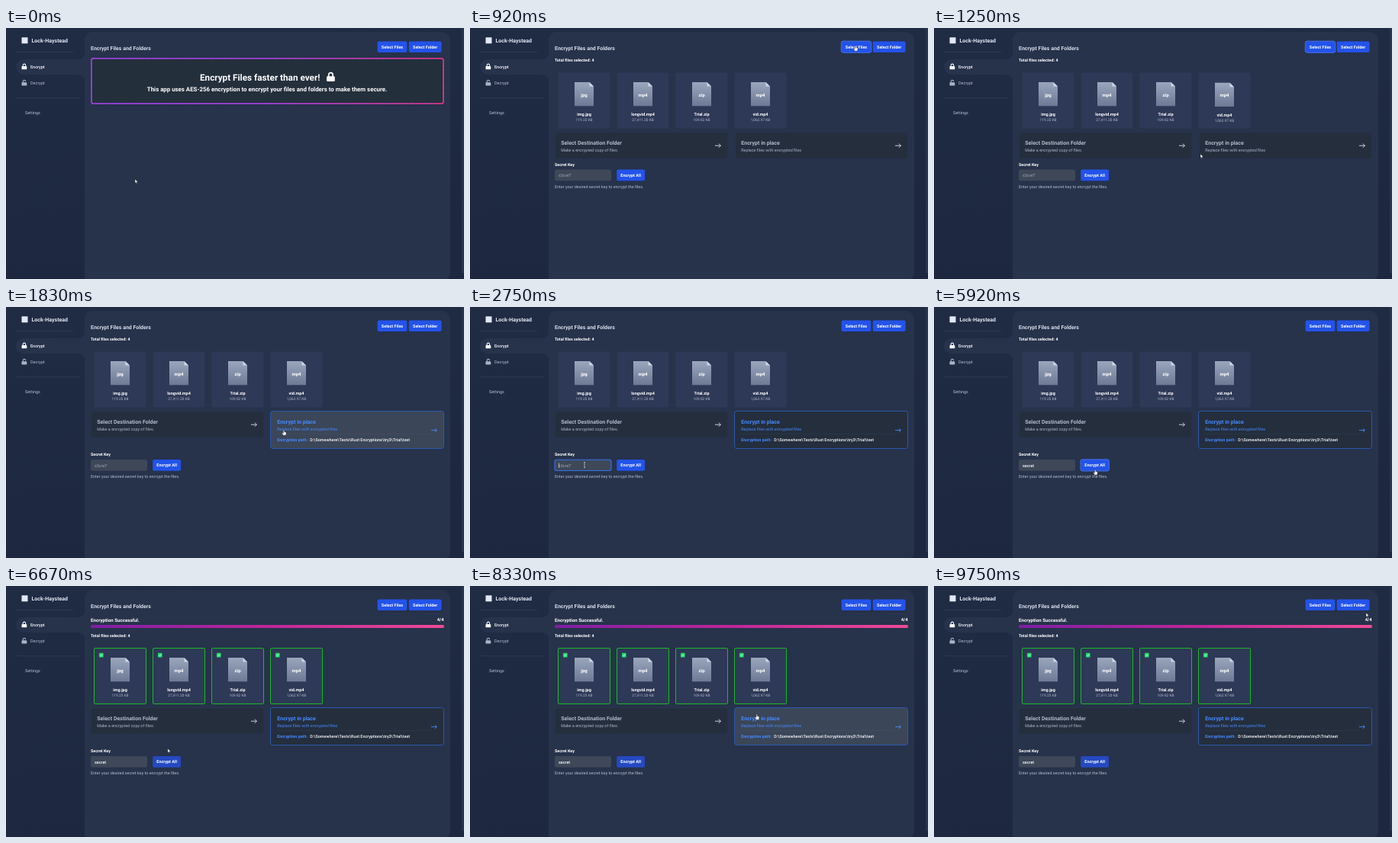
Write an HTML page with a canvas that moves like this. It is 600x329 px and loops after 9.91 s.

```html
<!DOCTYPE html>
<html lang="en">
<head>
<meta charset="utf-8">
<title>File encryption demo</title>
<style>
  html, body { margin: 0; width: 100%; height: 100%; overflow: hidden; background: #1e2940; }
  canvas { display: block; width: 600px; height: 329px; }
</style>
</head>
<body>
<canvas id="stage"></canvas>
<script>
const W = 600, H = 329, LOOP = 9910, FPS = 12;
const canvas = document.getElementById('stage');
const ctx = canvas.getContext('2d');
const dpr = window.devicePixelRatio || 1;
canvas.width = W * dpr;
canvas.height = H * dpr;

const BLUE = '#2353ea', LINK = '#458aff', PANEL = '#242e3d', MAIN = '#27324b';

const files = [
  ['jpg', 'img.jpg', '119.25 KB'],
  ['mp4', 'longvid.mp4', '27,411.20 KB'],
  ['zip', 'Trial.zip', '109.82 KB'],
  ['mp4', 'vid.mp4', '1,062.97 KB']
];

// Pointer path: time, x, y
const path = [
  [250, 169, 198], [580, 505, 23], [920, 505, 23], [1250, 349, 165],
  [1330, 352, 163], [1420, 352, 163], [1580, 364, 161], [2170, 364, 161],
  [2420, 150, 207], [5250, 150, 207], [5670, 211, 213], [6830, 212, 213],
  [7420, 243, 208], [7590, 243, 208], [7920, 372, 207], [8250, 372, 207],
  [8420, 380, 124], [8750, 380, 124], [9000, 566, 35]
];
const keyTimes = [2920, 3330, 3830, 4330, 4420, 4580];

const clamp = v => Math.max(0, Math.min(1, v));
const ramp = (t, a, b) => clamp((t - a) / (b - a));
const easeOut = p => 1 - (1 - p) * (1 - p);
const inside = (p, x, y, w, h) => p.x >= x && p.x <= x + w && p.y >= y && p.y <= y + h;

function pointerAt(t) {
  let a = path[0];
  for (const b of path) {
    if (t < b[0]) {
      const p = ramp(t, a[0], b[0]);
      return { x: a[1] + (b[1] - a[1]) * p, y: a[2] + (b[2] - a[2]) * p };
    }
    a = b;
  }
  return { x: a[1], y: a[2] };
}

// y is the middle of the capitals
function text(str, x, y, size, color, weight = 400, align = 'left') {
  ctx.font = `${weight} ${size}px Roboto, "Open Sans", sans-serif`;
  ctx.textAlign = align;
  ctx.fillStyle = color;
  ctx.fillText(str, x, y + size * 0.355);
}

function box(x, y, w, h, r, fill, stroke, line = 1) {
  ctx.beginPath();
  ctx.roundRect(x, y, w, h, r);
  if (fill) { ctx.fillStyle = fill; ctx.fill(); }
  if (stroke) { ctx.strokeStyle = stroke; ctx.lineWidth = line; ctx.stroke(); }
}

function poly(points, fill, stroke, line = 1) {
  ctx.beginPath();
  points.forEach(([x, y], i) => i ? ctx.lineTo(x, y) : ctx.moveTo(x, y));
  if (fill) { ctx.closePath(); ctx.fillStyle = fill; ctx.fill(); }
  if (stroke) { ctx.strokeStyle = stroke; ctx.lineWidth = line; ctx.stroke(); }
}

function gradient(x0, y0, x1, y1, ...colors) {
  const g = ctx.createLinearGradient(x0, y0, x1, y1);
  colors.forEach((c, i) => g.addColorStop(i / (colors.length - 1), c));
  return g;
}

function lock(x, y, w, color, open) {
  const h = w * 1.14, r = w * 0.25, mid = x + w / 2;
  box(x, y + h * 0.44, w, h * 0.56, w * 0.13, color);
  ctx.beginPath();
  ctx.moveTo(mid - r, y + h * 0.5);
  ctx.lineTo(mid - r, y + r + w * 0.08);
  ctx.arc(mid, y + r + w * 0.08, r, Math.PI, 0);
  ctx.lineTo(mid + r, y + h * (open ? 0.3 : 0.5));
  ctx.strokeStyle = color;
  ctx.lineWidth = w * 0.16;
  ctx.stroke();
}

function button(label, x, y, w, fill, ring) {
  box(x, y, w, 14.6, 2, fill);
  if (ring) box(x - 0.3, y - 0.3, w + 0.6, 15.2, 2.4, null, '#4a78f2', 0.9);
  text(label, x + w / 2, y + 7.4, 5.45, '#ffffff', 700, 'center');
}

function frame() {
  ctx.fillStyle = gradient(0, 0, 40, H, '#202b44', '#1d2840');
  ctx.fillRect(0, 0, W, H);
  ctx.fillStyle = '#2a354d';
  ctx.fillRect(597, 0, 3, 321);
  box(103, 5, 479, 327, [10, 12, 12, 6], MAIN);

  // Active tab flares into the main area
  ctx.beginPath();
  ctx.moveTo(104, 31);
  ctx.quadraticCurveTo(103, 41, 93, 41);
  ctx.lineTo(23, 41);
  ctx.arc(23, 51, 10, -Math.PI / 2, Math.PI / 2, true);
  ctx.lineTo(93, 61);
  ctx.quadraticCurveTo(103, 61, 104, 71);
  ctx.fillStyle = MAIN;
  ctx.fill();

  box(20.5, 12.3, 8, 8, 0, '#e3e9f3');
  text('Lock-Haystead', 33.5, 16.4, 7, '#e3e9f3', 700);
  ctx.fillStyle = '#35415a';
  ctx.fillRect(13, 31, 75, 0.7);
  ctx.fillRect(13, 91.5, 84, 0.7);
  lock(20.5, 46.6, 6.8, '#f8fafc');
  text('Encrypt', 32, 51, 5.5, '#ffffff', 500);
  lock(20.5, 67.8, 6.8, '#aab4c6', true);
  text('Decrypt', 32, 72.2, 5.5, '#b6c0d0');
  text('Settings', 25, 111, 5.45, '#b6c0d0');
}

function banner() {
  const edge = gradient(111, 0, 574, 0, '#a944f6', '#b544ee', '#ea3a98');
  box(111.9, 39.8, 461, 59.4, 2.5, '#242f3c');
  ctx.globalAlpha = 0.5;
  box(111.9, 39.8, 461, 59.4, 2.5, null, edge, 1.8);
  ctx.globalAlpha = 1;
  ctx.setLineDash([1.6, 0.8]);
  box(111.9, 39.8, 461, 59.4, 2.5, null, edge, 1.8);
  ctx.setLineDash([]);
  text('Encrypt Files faster than ever!', 254, 64.8, 11.74, '#ffffff', 700);
  lock(420, 57.8, 10.8, '#ffffff');
  text('This app uses AES-256 encryption to encrypt your files and folders to make them secure.',
    342, 80.2, 7.86, '#ffffff', 700, 'center');
}

function fileCard([ext, name, size], x, y, done, nudge) {
  box(x - 0.5, y - 0.5, 68, 73, 1.5, '#2e3957');
  if (done) {
    box(x - 0.5, y - 0.5, 68, 73, 1.5, null, '#17bb22', 1);
    box(x + 6, y + 5.8, 5.6, 5.6, 0.6, '#20de6e');
    poly([[x + 7.3, y + 8.7], [x + 8.5, y + 9.8], [x + 10.5, y + 7.4]], null, '#e8fff0', 0.8);
  }
  y += nudge;
  const left = x + 21, right = x + 46, top = y + 12, base = y + 43.2;
  poly([[left, top], [right - 5.5, top], [right, top + 5.5], [right, base], [left, base]],
    gradient(left, top, left, base, '#9aa6bd', '#6e7a95'));
  poly([[right - 5.5, top], [right, top + 5.5], [right - 5.5, top + 5.5]], '#cdd5e2');
  const mid = x + 33.5;
  text(ext, mid, y + 28.4, 6, '#ffffff', 700, 'center');
  text(name, mid, y + 53.8, 5.5, '#ffffff', 700, 'center');
  text(size, mid, y + 61.7, 4.8, '#b0bacb', 400, 'center');
}

function arrow(x, y, color) {
  poly([[x, y], [x + 7.4, y]], null, color, 0.9);
  poly([[x + 4.8, y - 2.6], [x + 7.4, y], [x + 4.8, y + 2.6]], null, color, 0.9);
}

function choice(title, note, x, y, open, hover) {
  const chosen = open > 0, fill = hover ? '#3b4658' : PANEL;
  if (chosen) box(x - 0.5, y - 0.5, 227, 34 + 15 * open, 3, fill, '#2b58ae', 1);
  else box(x + 1.2, y + 0.4, 224.8, 33.2, 2, fill);
  text(title, x + 8.2, y + 13.6, 7.07, chosen ? LINK : '#b0bbcb', 700);
  text(note, x + 8.2, y + 23.1, 5.45, chosen ? LINK : '#acb7c8');
  arrow(x + 210, y + 17.2 + 7.4 * open, chosen ? LINK : '#dbe2ec');
  if (open > 0.6) {
    ctx.fillStyle = hover ? '#445165' : '#2e3a4c';
    ctx.fillRect(x + 8, y + 29.4, 202, 0.6);
    text('Encryption path:', x + 8.2, y + 37.3, 5.43, LINK, 700);
    text('D:\\Somewhere\\Tests\\Rust Encryptions\\try3\\Trial\\test', x + 51.3, y + 37.3, 5.42, '#ffffff', 500);
  }
}

function pointer(p, kind) {
  ctx.save();
  ctx.translate(p.x, p.y);
  if (kind === 'text') {
    poly([[-1, -3.5], [1, -3.5]], null, '#dfe5ee', 0.6);
    poly([[0, -3.5], [0, 3.5]], null, '#dfe5ee', 0.6);
    poly([[-1, 3.5], [1, 3.5]], null, '#dfe5ee', 0.6);
  } else if (kind === 'hand') {
    poly([[-0.7, 0], [0.5, 0], [0.6, 2.5], [3, 3.2], [3.1, 5], [2.4, 7.2], [-0.8, 7.2], [-2.4, 4.2], [-1.8, 3.6], [-0.7, 4.4]],
      '#ffffff', '#111827', 0.4);
  } else {
    poly([[0, 0], [0, 5.4], [1.2, 4.3], [2, 6.2], [2.9, 5.8], [2.1, 4], [3.8, 4]],
      '#ffffff', '#111827', 0.45);
  }
  ctx.restore();
}

function draw(t) {
  const p = pointerAt(t);
  const loaded = t >= 920, done = t >= 6170;
  const open = easeOut(ramp(t, 1500, 1830));
  const shift = done ? 23 : 0;
  const actionY = 137 + shift, formY = 178.6 + 14.5 * open + shift;
  const inputY = formY + 7;
  const typing = t >= 2750 && t < 5920;
  let kind = 'arrow';
  if (inside(p, 487, 17.5, 38, 14.6)) kind = 'hand';

  frame();
  text('Encrypt Files and Folders', 111, 26.2, 6.97, '#d6deea', 700);
  button('Select Files', 486.6, 17.5, 38.8, BLUE, t >= 670 && t < 1500);
  button('Select Folder', 527.7, 17.5, 42.8, BLUE);

  if (!loaded) {
    banner();
  } else {
    if (done) {
      text('Encryption Successful.', 111, 44.8, 6.18, '#ffffff', 700);
      text('4/4', 573.6, 44.3, 5.8, '#ffffff', 700, 'right');
      box(111, 51, 463, 4, 2, '#3a455b');
      const grow = easeOut(ramp(t, 6080, 6500));
      box(111, 51, 463 * grow, 4, 2, gradient(111, 0, 574, 0, '#7d1fa6', '#bd2799', '#f04a97'));
    }
    text('Total files selected: 4', 111, 42.5 + shift, 5.38, '#ffffff', 700);
    files.forEach((f, i) => {
      const nudge = i === 3 && t >= 1170 && t < 1330 ? 0.8 : 0;
      fileCard(f, 116 + 77 * i, 59 + shift, t >= 6330, nudge);
    });

    const hover = inside(p, 350, actionY, 223, 35 + 15 * open);
    choice('Select Destination Folder', 'Make a encrypted copy of files.', 111, actionY, 0, false);
    choice('Encrypt in place', 'Replace files with encrypted files', 347, actionY, open, hover);

    text('Secret Key', 111, formY, 5.38, '#ffffff', 700);
    box(111, inputY, 74, 14.6, 2.5, '#3e4858');
    if (typing) box(111, inputY + 0.2, 74, 14.2, 2.5, null, '#3273e6', 1.1);
    const typed = 'secret'.slice(0, keyTimes.filter(k => t >= k).length);
    text(typed || 's3creT', 116, inputY + 7.6, 5.43, typed ? '#ffffff' : '#a0a9b8', typed ? 500 : 400);
    if (typing && t < 4830) {
      const caret = 116.3 + (typed ? ctx.measureText(typed).width : 0);
      ctx.fillStyle = '#f8fafc';
      ctx.fillRect(caret, inputY + 4.5, 0.6, 6);
    }
    button('Encrypt All', 192.2, inputY, 36.8, t >= 6420 ? '#2449c2' : BLUE, t >= 5670 && t < 6170);
    text('Enter your desired secret key to encrypt the files.', 111, formY + 29, 5.43, '#b6c0d0');

    if (hover || inside(p, 192.5, inputY, 36.2, 14.6)) kind = 'hand';
    else if (inside(p, 111, inputY, 74, 14.6)) kind = 'text';
  }
  if (t < 2920 || t >= 5330) pointer(p, kind);
}

const start = performance.now();
function tick() {
  const t = (performance.now() - start) % LOOP;
  const step = Math.floor((t + 4) * FPS / 1000);
  ctx.setTransform(dpr, 0, 0, dpr, 0, 0);
  ctx.textRendering = 'geometricPrecision';
  draw(Math.round(step * 100 / FPS) * 10);
  requestAnimationFrame(tick);
}
tick();
</script>
</body>
</html>
```
